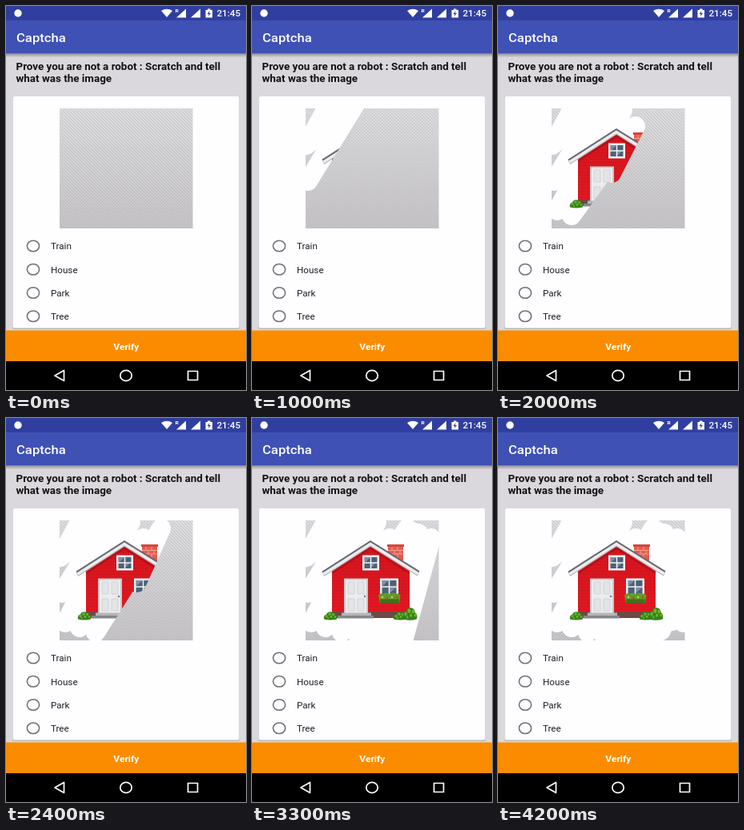
An HTML page for the animation above (4.3 s loop, 300 px wide and 480 px high).

```html
<!DOCTYPE html>
<html lang="en">
<head>
<meta charset="utf-8">
<title>Captcha</title>
<style>
html, body { margin: 0; width: 100%; height: 100%; overflow: hidden; background: #dad8dc; }
svg { display: block; width: 300px; height: 480px; font-family: Roboto, sans-serif; }
</style>
</head>
<body>
<svg viewBox="0 0 300 480">
  <defs>
    <linearGradient id="foil" x1="0" y1="0" x2="0" y2="1">
      <stop offset="0" stop-color="#dcdbdd"/><stop offset="1" stop-color="#c5c3c6"/>
    </linearGradient>
    <linearGradient id="shade" x1="0" y1="0" x2="0" y2="1">
      <stop offset="0" stop-color="#000" stop-opacity=".32"/><stop offset="1" stop-color="#000" stop-opacity="0"/>
    </linearGradient>
    <linearGradient id="wall" x1="0" y1="0" x2="0" y2="1">
      <stop offset="0" stop-color="#d4141d"/><stop offset="1" stop-color="#e01822"/>
    </linearGradient>
    <pattern id="hatch" width="4" height="4" patternUnits="userSpaceOnUse">
      <path d="M-1 -1L5 5M-1 3L1 5M3 -1L5 1" stroke="#a9a8ab" stroke-opacity=".42"/>
    </pattern>
    <pattern id="siding" width="4" height="4" patternUnits="userSpaceOnUse">
      <path d="M0 3.5H4" stroke="#b80f18" stroke-opacity=".4" stroke-width=".7"/>
    </pattern>
    <mask id="left" maskUnits="userSpaceOnUse" x="60" y="120" width="180" height="165">
      <path d="M60 120H240V285H60Z" fill="#fff"/>
      <polyline id="scratch" fill="none" stroke="#000" stroke-width="24" stroke-linecap="round" stroke-linejoin="round"/>
    </mask>
    <g id="bush">
      <path d="M-8 4Q-9 -1 -5 -2Q-3 -6 1 -5Q5 -5 6 -1Q9 0 8 4Q0 6 -8 4Z" fill="#37801a"/>
      <g fill="#6db32f">
        <circle cx="-5" cy="0" r="1.600"/><circle cx="-1" cy="-2.500" r="1.800"/><circle cx="3.500" cy="-2" r="1.600"/>
        <circle cx="1" cy="1" r="1.400"/><circle cx="6" cy="1" r="1.300"/><circle cx="-3" cy="2.500" r="1.100"/>
      </g>
    </g>
  </defs>

  <rect width="300" height="480" fill="#dad8dc"/>
  <rect y="59.500" width="300" height="5" fill="url(#shade)"/>
  <rect width="300" height="59.500" fill="#3f51b5"/>
  <rect width="300" height="18" fill="#303f9f"/>

  <g fill="#fff">
    <circle cx="15" cy="9" r="4.700"/>
    <path d="M194 6Q201 1.500 208 6L201 14Z"/>
    <path d="M225 3.500V14.500H213ZM243 3.500V14.500H231Z"/>
    <path d="M249.500 5H252V3.500H255.500V5H258V14.500H249.500Z"/>
    <path d="M254.500 6L251.500 10H253.500L253 13L256 9H254Z" fill="#303f9f"/>
  </g>

  <rect x="8" y="113" width="284" height="291" rx="2" fill="#b9b8bb"/>
  <rect x="8.500" y="113" width="283" height="289.500" rx="2" fill="#fefdff"/>

  <g id="house">
    <path d="M170 160H189V183L170 174Z" fill="#e65c4e"/>
    <path d="M170 165.500H189M170 170H189M175 161V165M182 161V165M178 166V170M185 166V170M175 170V175M182 170V178" stroke="#f3b0a6" stroke-width=".8"/>
    <path d="M169 158H190V161H169Z" fill="#d2483c"/>
    <path d="M100 188L148 158L197 188V242H100Z" fill="url(#wall)"/>
    <path d="M100 188L148 158L197 188V242H100Z" fill="url(#siding)"/>
    <path d="M100 242H197V250H100Z" fill="#6f4a44"/>
    <path d="M100 194L148 163L197 194" fill="none" stroke="#8c0c14" stroke-width="2" opacity=".5"/>
    <path d="M89 196L148 158L208 195.500" fill="none" stroke="#b4b4b9" stroke-width="4.500"/>
    <path d="M89 195L148 157L208 194.500" fill="none" stroke="#ececee" stroke-width="4"/>
    <path d="M88 192.700L148 154.200L209 192.200" fill="none" stroke="#67676d" stroke-width="2"/>
    <path d="M138 171.500H159V190.500H138Z" fill="#f4f4f4"/>
    <path d="M140.500 174H156.500V188H140.500Z" fill="#4d6079"/>
    <path d="M141 174L148 174L141 181ZM149 181L155 181L149 187Z" fill="#7b8fa5"/>
    <path d="M148.500 173V189M140 181H157" stroke="#f4f4f4" stroke-width="1.500"/>
    <path d="M160 200.500H183V222H160Z" fill="#f4f4f4"/>
    <path d="M162.500 203H180.500V221H162.500Z" fill="#4d6079"/>
    <path d="M163 203H171L163 210ZM172 212H180L172 219Z" fill="#7b8fa5"/>
    <path d="M171.500 202V222M162 211H181" stroke="#f4f4f4" stroke-width="1.500"/>
    <path d="M158 222Q160 218 164 220Q168 217 172 220Q177 217 180 220Q185 218 185.500 223L184 231H160Z" fill="#5c9f28"/>
    <path d="M160 226.500H184L183 231.500H161Z" fill="#3f6f1d"/>
    <g fill="#e8c832"><circle cx="163" cy="224" r="1.300"/><circle cx="175" cy="224" r="1.300"/></g>
    <g fill="#d93345"><circle cx="169" cy="225" r="1.300"/><circle cx="181" cy="224" r="1.300"/></g>
    <path d="M115 200.500H145V245H115Z" fill="#c9cacd"/>
    <path d="M117 202.500H143V245H117Z" fill="#ececee"/>
    <path d="M120 205H128V220H120ZM132 205H140V220H132ZM120 226H128V241H120ZM132 226H140V241H132Z" fill="#e3e4e6" stroke="#cdced1" stroke-width=".8"/>
    <circle cx="141" cy="223" r="1.200" fill="#77777c"/>
    <path d="M112 243.500H149V247H112Z" fill="#b5b6b9"/>
    <path d="M107 247H152V250.500H107Z" fill="#85868a"/>
    <use href="#bush" x="98" y="247.500"/>
    <use href="#bush" x="185" y="247.500"/>
    <use href="#bush" transform="translate(197.500 245) scale(1.080 1.550)"/>
  </g>

  <g mask="url(#left)">
    <rect x="67" y="128" width="166.500" height="150" fill="url(#foil)"/>
    <rect x="67" y="128" width="166.500" height="150" fill="url(#hatch)"/>
  </g>

  <g id="options"></g>

  <rect y="405.500" width="300" height="38.500" fill="#fb8c00"/>
  <rect y="444" width="300" height="36" fill="#000"/>
  <g fill="none" stroke="#fff" stroke-width="1.700">
    <path d="M72.500 455.500V468.500L61 462Z" stroke-linejoin="round"/>
    <ellipse cx="150" cy="462" rx="7.200" ry="6.600"/>
    <path d="M227.500 456.500H239.500V467.500H227.500Z"/>
  </g>
  <g id="labels"></g>
</svg>
<script>
const LOOP = 4300, STEP = 100;
const WIDE = 10 / 9; // the phone screen is shown wider than it is
const el = id => document.getElementById(id);

function label(text, x, y, size, weight, fill, anchor = "start") {
  return `<text transform="translate(${x} ${y}) scale(${WIDE} 1)" font-size="${size}" ` +
    `font-weight="${weight}" fill="${fill}" text-anchor="${anchor}">${text}</text>`;
}

const choices = ["Train", "House", "Park", "Tree"];
el("options").innerHTML = choices.map((name, i) => {
  const y = 300 + i * 29.25;
  return `<ellipse cx="34" cy="${y}" rx="7.600" ry="6.800" fill="none" stroke="#737373" stroke-width="1.600"/>` +
    label(name, 56, y + 4.4, 10.5, 400, "#212121");
}).join("");

el("labels").innerHTML =
  label("Captcha", 13, 45, 15, 500, "#fff") +
  label("21:45", 263.5, 13, 10.5, 500, "#fff") +
  label("R", 211.5, 8, 6, 700, "#fff") +
  label("Prove you are not a robot : Scratch and tell", 12.5, 80.4, 12.08, 700, "#111") +
  label("what was the image", 12.5, 94.8, 12.08, 700, "#111") +
  label("Verify", 150.3, 429.5, 10.8, 700, "#fff", "middle");

// Turning points of the finger: time, x, y
const turns = [
  [300, 102, 112], [500, 68, 174], [700, 132, 118], [1000, 70, 219],
  [1200, 146, 120], [1350, 74, 256], [1500, 156, 130], [1700, 92, 262],
  [1900, 172, 150], [2100, 112, 268], [2300, 194, 138], [2500, 133, 274],
  [2600, 200, 142], [2700, 146, 276], [2800, 208, 144], [2900, 157, 274],
  [3000, 210, 150], [3100, 174, 276], [3200, 224, 150], [3300, 190, 275],
  [3500, 236, 164], [3600, 204, 266], [3750, 238, 180], [3850, 218, 254],
  [3950, 240, 200], [4050, 232, 256]
];

function trail(t) {
  const pts = [];
  for (let i = 0; i < turns.length; i++) {
    const [time, x, y] = turns[i];
    if (time <= t) {
      pts.push([x, y]);
      continue;
    }
    if (i) {
      const [t0, x0, y0] = turns[i - 1];
      const k = (t - t0) / (time - t0);
      pts.push([x0 + (x - x0) * k, y0 + (y - y0) * k]);
    }
    break;
  }
  return pts.length > 1 ? pts.map(p => p.join(",")).join(" ") : "";
}

function draw(now) {
  const t = Math.floor((now % LOOP) / STEP) * STEP;
  el("scratch").setAttribute("points", trail(t));
}

const start = performance.now();
function tick() {
  draw(performance.now() - start);
  requestAnimationFrame(tick);
}
tick();
</script>
</body>
</html>
```
